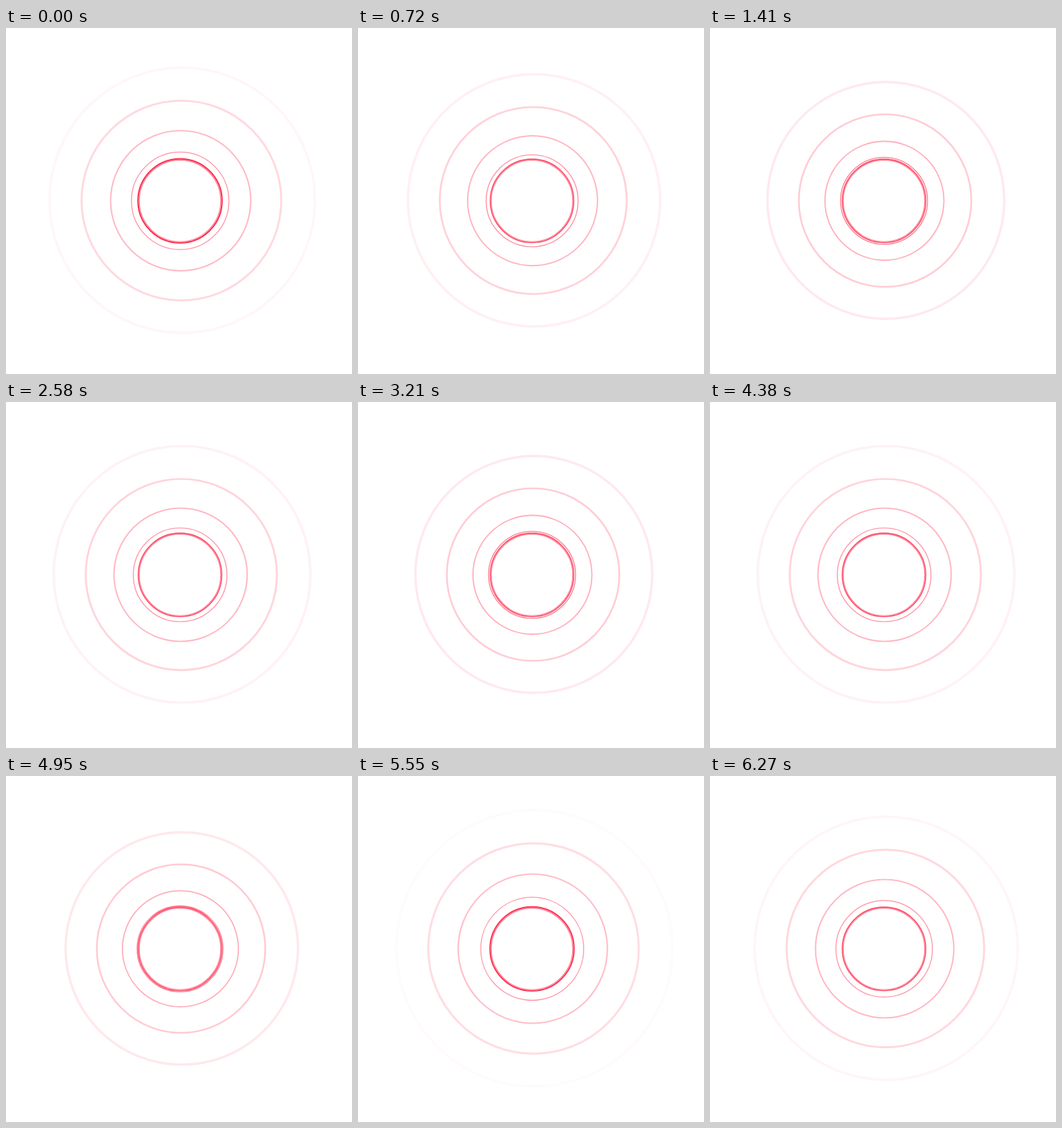
An HTML page with a canvas for the animation above (6.3 s loop, 520 by 520 pixels).

```html
<!DOCTYPE html>
<html>
<head>
<meta charset="utf-8">
<style>
  html, body { margin: 0; height: 100%; overflow: hidden; background: #fff; }
  canvas { display: block; }
</style>
</head>
<body>
<canvas id="stage" width="520" height="520"></canvas>
<script>
const ctx = document.getElementById('stage').getContext('2d');
const LOOP = 6300, GAP = 900, STEP = 30;
const BASE = 62, GROWTH = 232, DELAY = 60, FADE_END = 3860;

const ease = s => s * s * (3 - 2 * s);

// Larger rings drift slightly to the right and up.
function ring(r, width, alpha) {
  ctx.globalAlpha = alpha;
  ctx.lineWidth = width;
  ctx.beginPath();
  ctx.arc(261.5 + (r - BASE) * 0.024, 259.8 - (r - BASE) * 0.006, r, 0, Math.PI * 2);
  ctx.stroke();
}

function pulse(age) {
  if (age >= FADE_END) return;
  const r = Math.max(63.6, BASE + GROWTH * ease(Math.max(0, age - DELAY) / LOOP));
  const flash = 0.3 * Math.max(0, 1 - age / 800);
  ring(r, r * 0.0205, 0.00014 * (FADE_END - age) + flash);
}

function draw(now) {
  const t = Math.floor((now % LOOP) / STEP) * STEP;
  ctx.clearRect(0, 0, 520, 520);
  ctx.strokeStyle = '#ff1439';
  ring(61.2, 1.1, 0.65);
  ring(62.8, 1.4, 0.85);
  for (let start = 0; start < LOOP; start += GAP) pulse((t - start + LOOP) % LOOP);
}

const begin = performance.now();
function tick() {
  draw(performance.now() - begin);
  requestAnimationFrame(tick);
}
tick();
</script>
</body>
</html>
```
